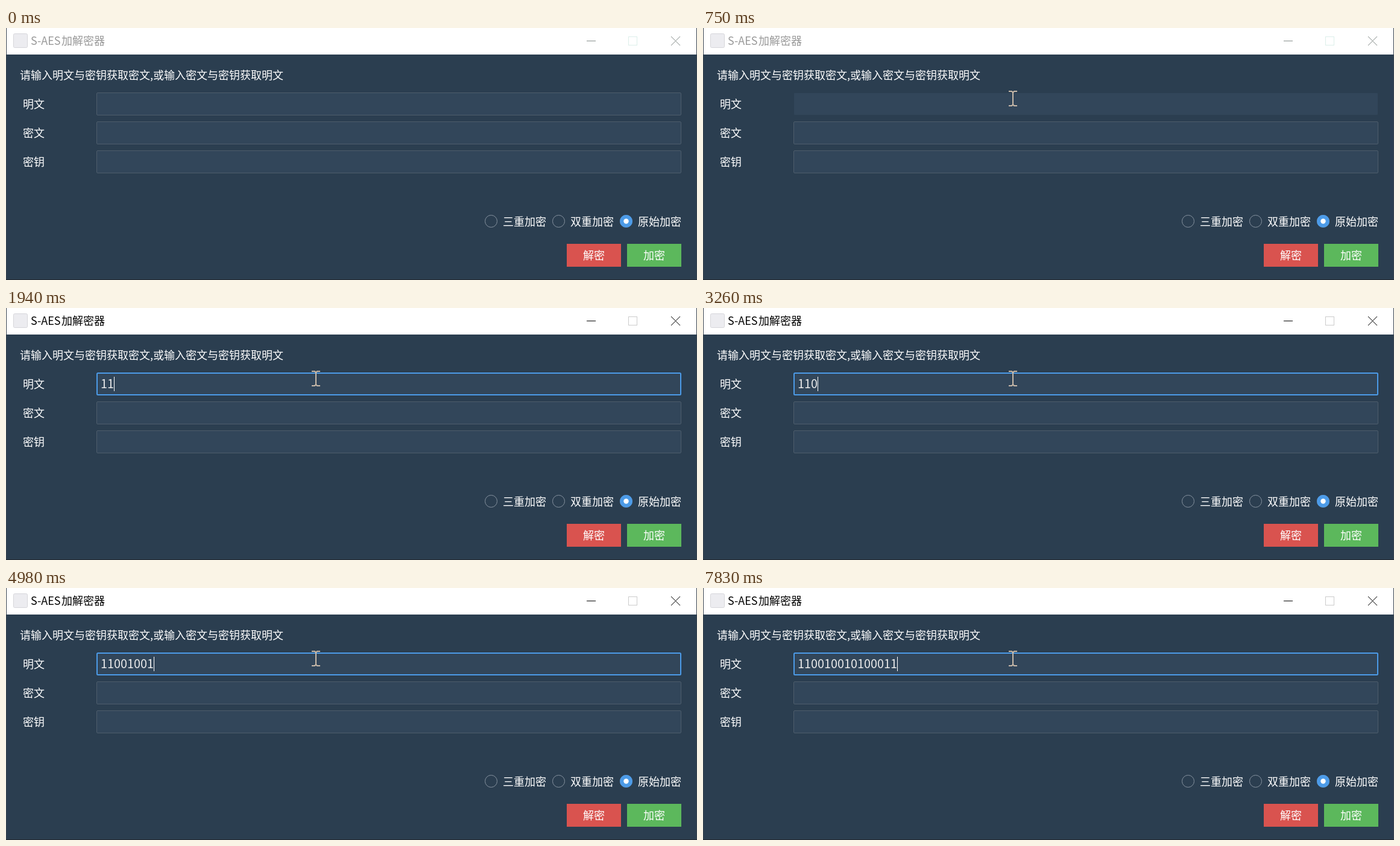
An HTML page that plays this animation: 1146 px wide and 418 px high, repeating every 8 s.

```html
<!DOCTYPE html>
<html lang="zh-CN">
<head>
<meta charset="utf-8">
<style>
  html, body { margin: 0; width: 100%; height: 100%; overflow: hidden; background: #2b3e50; }
  svg { display: block; }
  text { font: 18px "Noto Sans CJK SC", "Noto Sans CJK", sans-serif; fill: #fff; white-space: pre; }
  #typed { font-size: 19.82px; fill: #ebebeb; }
  .field { fill: #32465a; stroke: #4e5d6c; }
  .radio { fill: none; stroke: #8793a0; }
  #title { fill: #999; }
  .controls { fill: none; stroke: #868e8b; }
  .controls rect { stroke: #dcefea; }
  .active #title { fill: #000; }
  .active .controls { stroke: #000; }
  .active .controls rect { stroke: #ccc; }
</style>
</head>
<body>
<svg id="stage" width="1146" height="418" viewBox="0 0 1146 418">
  <rect width="1146" height="418" fill="#2b3e50"/>
  <rect width="1146" height="44" fill="#fff"/>
  <path d="M.5 0V418M1145.5 0V418" stroke="#38434e"/>
  <path d="M0 417.5H1146" stroke="#20272e"/>

  <rect x="12.5" y="9.5" width="23" height="23" rx="2" fill="#ececf0" stroke="#d5d5da"/>
  <text id="title" y="28">
    <tspan x="41">S-AES</tspan><tspan x="92">加解密器</tspan>
  </text>
  <g class="controls">
    <path d="M963 21.5H978M1103 14L1118 29M1118 14L1103 29"/>
    <rect x="1032.5" y="14.5" width="14" height="14"/>
  </g>

  <text x="23" y="85">请输入明文与密钥获取密文,或输入密文与密钥获取明文</text>
  <g id="form"></g>
  <text id="typed" x="157" y="133"></text>
  <rect id="caret" y="114" width="1" height="24" fill="#fff"/>

  <g id="arrow">
    <path d="M.5.5V23.5L5.8 18.4 9 26 12.4 24.5 9.2 17H16.5Z" fill="#fff" stroke="#000"/>
  </g>
  <g id="beam">
    <path d="M-7-12H-2L0-10 2-12H7M0-10V10M-7 12H-2L0 10 2 12H7" fill="none" stroke="#c8b9a9" stroke-width="2"/>
  </g>
  <circle id="press" cx="511" cy="115" r="18" fill="#ff0" fill-opacity=".5"/>
</svg>
<script>
const LOOP = 8000;
const FOCUS_AT = 1010, RELEASE_AT = 1140;
const MOVE_START = 330, MOVE_STEP = 70;
const DIGITS = "110010010100011";
const KEY_TIMES = [1600, 1940, 3260, 3390, 3920, 4380, 4650, 4980,
                   5240, 5640, 6570, 6840, 7110, 7570, 7830];
const CARET_OFF = [[1670, 1940], [2540, 2870], [3460, 3790], [4380, 4580],
                   [5240, 5570], [6170, 6500], [7110, 7370]];
const POINTER_PATH = [[922, 342], [772, 247], [604, 149], [546, 123],
                      [524, 118], [516, 117], [514, 117]];

const byId = id => document.getElementById(id);
const stage = byId("stage"), typed = byId("typed"), caret = byId("caret");
const arrow = byId("arrow"), beam = byId("beam"), press = byId("press");

const field = (label, y) => `
  <text x="28" y="${y + 26}">${label}</text>
  <rect class="field" x="150.5" y="${y + .5}" width="969" height="37" rx="1.5"/>`;

const radio = (label, x, selected) => `
  <circle class="radio" cx="${x}" cy="320.5" r="10"/>
  ${selected ? `<circle cx="${x}" cy="320.5" r="10.5" fill="#4c9be8"/>
  <circle cx="${x}" cy="320.5" r="4.2" fill="#fff"/>` : ""}
  <text x="${x + 19.5}" y="328">${label}</text>`;

const button = (label, x, color) => `
  <rect x="${x}" y="358" width="90" height="38" fill="${color}"/>
  <text x="${x + 27}" y="384">${label}</text>`;

byId("form").innerHTML =
  field("明文", 107) + field("密文", 155) + field("密钥", 203) +
  radio("三重加密", 804.5) + radio("双重加密", 916.5) + radio("原始加密", 1028.5, true) +
  button("解密", 930, "#d9534f") + button("加密", 1030, "#5cb85c");

const plaintext = document.querySelector(".field");
const show = (element, visible) => element.setAttribute("display", visible ? "inline" : "none");

function drawField(focused, hovered) {
  const inset = focused ? 1 : .5;
  const style = {
    x: 150 + inset, y: 107 + inset, width: 970 - 2 * inset, height: 38 - 2 * inset
  };
  for (const name in style) plaintext.setAttribute(name, style[name]);
  plaintext.style.stroke = focused ? "#4c9be8" : hovered ? "#2b3e50" : "";
  plaintext.style.strokeWidth = 2 * inset;
}

function drawPointer(t) {
  const step = Math.min(Math.floor((t - MOVE_START) / MOVE_STEP), POINTER_PATH.length - 1);
  const visible = step >= 0;
  const [x, y] = POINTER_PATH[Math.max(step, 0)];
  const inField = visible && y < 145;
  show(arrow, visible && !inField);
  show(beam, inField);
  for (const pointer of [arrow, beam]) pointer.setAttribute("transform", `translate(${x} ${y})`);
  return inField;
}

function draw(t) {
  const focused = t >= FOCUS_AT;
  const count = KEY_TIMES.filter(time => t >= time).length;
  stage.classList.toggle("active", focused);
  drawField(focused, drawPointer(t));
  typed.textContent = DIGITS.slice(0, count);
  caret.setAttribute("x", 157 + 11 * count);
  show(caret, focused && !CARET_OFF.some(([from, to]) => t >= from && t < to));
  show(press, focused && t < RELEASE_AT);
}

function tick() {
  draw(performance.now() % LOOP);
  requestAnimationFrame(tick);
}
tick();
</script>
</body>
</html>
```
